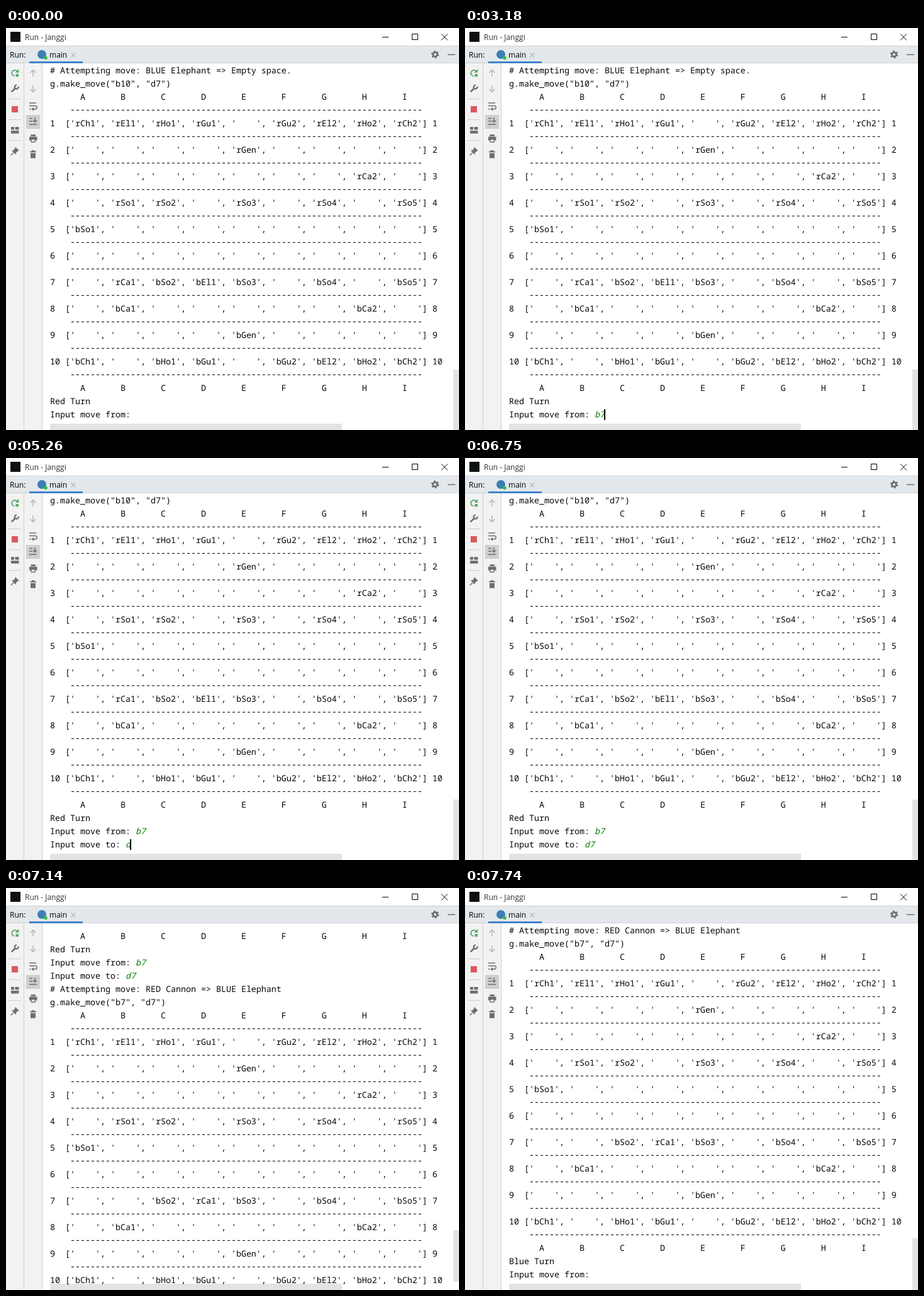
An HTML page for the animation above (8 s loop, 720 by 638 pixels).

```html
<!DOCTYPE html>
<html lang="en">
<head>
<meta charset="utf-8">
<title>Run - Janggi</title>
<style>
  html, body { margin: 0; width: 100%; height: 100%; overflow: hidden; background: #fff; }
  svg { display: block; }
  .ui { font: 12px "Open Sans", "Noto Sans", sans-serif; }
  #log { font: 13.3333px "Noto Sans Mono", "DejaVu Sans Mono", monospace; fill: #080808; text-rendering: geometricPrecision; font-variant-ligatures: none; }
  #log text { white-space: pre; }
  .typed { fill: #007f00; font-style: italic; }
  .line { fill: none; stroke: #6e6e6e; stroke-width: 1.5; }
  .pale { stroke: #b6b6b6; }
  .solid { fill: #6e6e6e; }
  .rule { fill: #d1d1d1; }
  .bar { fill: #000; fill-opacity: .11; }
</style>
</head>
<body>
<svg width="720" height="638" viewBox="0 0 720 638">
  <defs><clipPath id="view"><rect x="58" y="56" width="662" height="582"/></clipPath></defs>
  <rect width="720" height="638" fill="#fff"/>

  <!-- title bar -->
  <rect x="7" y="6" width="16" height="16" fill="#0b1210"/>
  <text class="ui" x="30" y="19" fill="#333">Run - Janggi</text>
  <g fill="none" stroke="#000">
    <path d="M598 14.5h10M645.5 9.5h9v9h-9z"/>
    <path d="M692 9.5l10 10M702 9.5l-10 10"/>
  </g>

  <!-- tab bar -->
  <rect y="28" width="720" height="28" fill="#e2e8ec"/>
  <rect class="rule" y="28" width="720" height="1"/>
  <rect class="rule" y="55" width="720" height="1"/>
  <rect x="37" y="53" width="85" height="3" fill="#4083c9"/>
  <text class="ui" x="6" y="47">Run:</text>
  <circle cx="57" cy="42" r="7" fill="#3f7fb3"/>
  <circle cx="63" cy="47.5" r="2.8" fill="#36c03c"/>
  <text class="ui" x="69" y="47">main</text>
  <path class="line pale" style="stroke-width:1.1" d="M103.5 39.5l7 7M110.5 39.5l-7 7"/>
  <circle class="line" cx="682" cy="42" r="3.4" style="stroke-width:2.6"/>
  <circle class="line" cx="682" cy="42" r="5.2" stroke-dasharray="2.7 2.745" style="stroke-width:2.2"/>
  <path class="line" d="M702 42.3h12"/>

  <!-- side strips -->
  <rect y="56" width="58" height="582" fill="#f2f2f2"/>
  <rect class="rule" x="28" y="56" width="1" height="582"/>
  <rect class="rule" x="57" y="56" width="1" height="582"/>
  <path d="M4 112.5h20M4 145.5h20M4 178.5h20" stroke="#cdcdcd"/>

  <path d="M13.5 76.3A4.7 4.7 0 1 1 17.6 68.6" fill="none" stroke="#59a869" stroke-width="1.9"/>
  <path d="M20.3 65v5.7h-5.7zM15.5 73h4.5v4.3h-4.5z" fill="#59a869"/>
  <path class="line" style="stroke-width:2.7" d="M8.8 101.4L15 95.2"/>
  <path class="line" style="stroke-width:2.3" d="M19.6 92.8A3 3 0 1 1 16.9 90.6"/>
  <rect x="9" y="124" width="10" height="10" fill="#db5860"/>
  <path class="solid" d="M8 157h5v4.5h-5zM14.5 157h6v4.5h-6zM8 163h12.5v4.5h-12.5z"/>
  <path class="solid" d="M14.8 188.8l6 6-2.2.6-2.6 2.7-.2 3-6.9-6.9 3-.2 2.4-2.7z"/>
  <path class="line" d="M12.2 197.8l-4.4 4.2"/>

  <path class="line pale" d="M43 77V66.5M38.5 71l4.5-4.5 4.5 4.5"/>
  <path class="line pale" d="M43 91v10.5M38.5 97l4.5 4.5 4.5-4.5"/>
  <path class="line" d="M37 119h11M37 123.5h9.7a2.6 2.6 0 0 1 0 5.2h-3M37 128.7h2.5"/>
  <path class="solid" d="M44 125.7v6l-3.6-3z"/>
  <rect x="32" y="138" width="22" height="22" fill="#cfcfcf"/>
  <path class="line" d="M37 143.5h5M37 148h5M37 153h12M46 142v7.5M43 146.5l3 3 3-3"/>
  <path class="solid" d="M39.5 169h7.5v2.7h-7.5zM37 172.5h12.5v6h-12.5z"/>
  <path d="M40.2 176.5h6v4.5h-6z" fill="#f2f2f2" stroke="#6e6e6e" stroke-width="1.3"/>
  <path class="solid" d="M38 195.5h3v-1.5h4v1.5h3v1.8h-10zM39 198.5h8v8h-8z"/>

  <!-- console -->
  <g clip-path="url(#view)"><g id="log"></g></g>
  <rect id="caret" y="605" width="2" height="17"/>
  <rect class="bar" x="70" y="628" width="464" height="10"/>
  <rect class="bar" id="thumb" x="711" width="9"/>
</svg>
<script>
const LOOP = 8000, LEFT = 70, CHAR = 8, LEADING = 21;
const $ = id => document.getElementById(id);

const start = [
  "rCh1 rEl1 rHo1 rGu1 . rGu2 rEl2 rHo2 rCh2",
  ". . . . rGen . . . .",
  ". . . . . . . rCa2 .",
  ". rSo1 rSo2 . rSo3 . rSo4 . rSo5",
  "bSo1 . . . . . . . .",
  ". . . . . . . . .",
  ". rCa1 bSo2 bEl1 bSo3 . bSo4 . bSo5",
  ". bCa1 . . . . . bCa2 .",
  ". . . . bGen . . . .",
  "bCh1 . bHo1 bGu1 . bGu2 bEl2 bHo2 bCh2"
].map(row => row.split(" "));
const moved = start.map(row => [...row]);
moved[6][3] = moved[6][1];
moved[6][1] = ".";

function board(cells) {
  const head = " ".repeat(6) + [..."ABCDEFGHI"].join(" ".repeat(7));
  const dash = " ".repeat(4) + "-".repeat(70);
  const rows = cells.flatMap((row, i) => {
    const list = row.map(c => `'${c === "." ? "    " : c}'`).join(", ");
    return [`${i + 1}`.padEnd(3) + `[${list}] ${i + 1}`, dash];
  });
  return [head, dash, ...rows, head];
}

const lines = [
  "# Attempting move: BLUE Elephant => Empty space.",
  'g.make_move("b10", "d7")',
  ...board(start),
  "Red Turn",
  "Input move from: ",
  "Input move to: ",
  "# Attempting move: RED Cannon => BLUE Elephant",
  'g.make_move("b7", "d7")',
  ...board(moved),
  "Blue Turn",
  "Input move from: "
];

function add(parent, tag, attrs, text) {
  const el = document.createElementNS("http://www.w3.org/2000/svg", tag);
  for (const k in attrs) el.setAttribute(k, attrs[k]);
  el.textContent = text;
  return parent.appendChild(el);
}

const rows = lines.map((s, i) => {
  const lift = s.includes("--") ? 0.6 : 0;
  return add($("log"), "text", { x: LEFT, y: 72 + LEADING * i - lift }, s);
});
const [from, to] = [26, 27].map(i => add(rows[i], "tspan", { class: "typed" }, ""));

// time, scroll, lines printed, typed "from", typed "to", caret column (-1 hidden)
const steps = [
  [0, 0, 27, "", "", -1],
  [200, 0, 27, "", "", 17],
  [700, 0, 27, "", "", -1],
  [1200, 0, 27, "", "", 17],
  [1400, 0, 27, "b", "", 18],
  [1690, 0, 27, "b7", "", 19],
  [2690, 0, 27, "b7", "", -1],
  [3180, 0, 27, "b7", "", 19],
  [3480, 21, 27, "b7", "", 0],
  [3670, 21, 28, "b7", "", 15],
  [4160, 21, 28, "b7", "", -1],
  [4660, 21, 28, "b7", "", 15],
  [5260, 21, 28, "b7", "d", 16],
  [6160, 21, 28, "b7", "d7", 17],
  [6750, 21, 28, "b7", "d7", -1],
  [6950, 42, 28, "b7", "d7", 0],
  [7140, 495, 55, "b7", "d7", -1],
  [7240, 588, 55, "b7", "d7", 17],
  [7740, 588, 55, "b7", "d7", -1]
];
// scroll -> thumb top and height
const thumbs = { 0: [542, 96], 21: [542, 96], 42: [543, 95], 495: [543, 82], 588: [556, 82] };

let shown;
function draw() {
  const t = performance.now() % LOOP;
  const step = steps.findLast(s => s[0] <= t);
  if (step !== shown) {
    shown = step;
    const [, scroll, count, a, b, col] = step;
    $("log").setAttribute("transform", `translate(0 ${-scroll})`);
    rows.forEach((r, i) => r.setAttribute("visibility", i < count ? "visible" : "hidden"));
    from.textContent = a;
    to.textContent = b;
    $("caret").setAttribute("visibility", col < 0 ? "hidden" : "visible");
    $("caret").setAttribute("x", Math.max(LEFT, LEFT + col * CHAR - 1));
    const [top, height] = thumbs[scroll];
    $("thumb").setAttribute("y", top);
    $("thumb").setAttribute("height", height);
  }
  requestAnimationFrame(draw);
}
draw();
</script>
</body>
</html>
```
